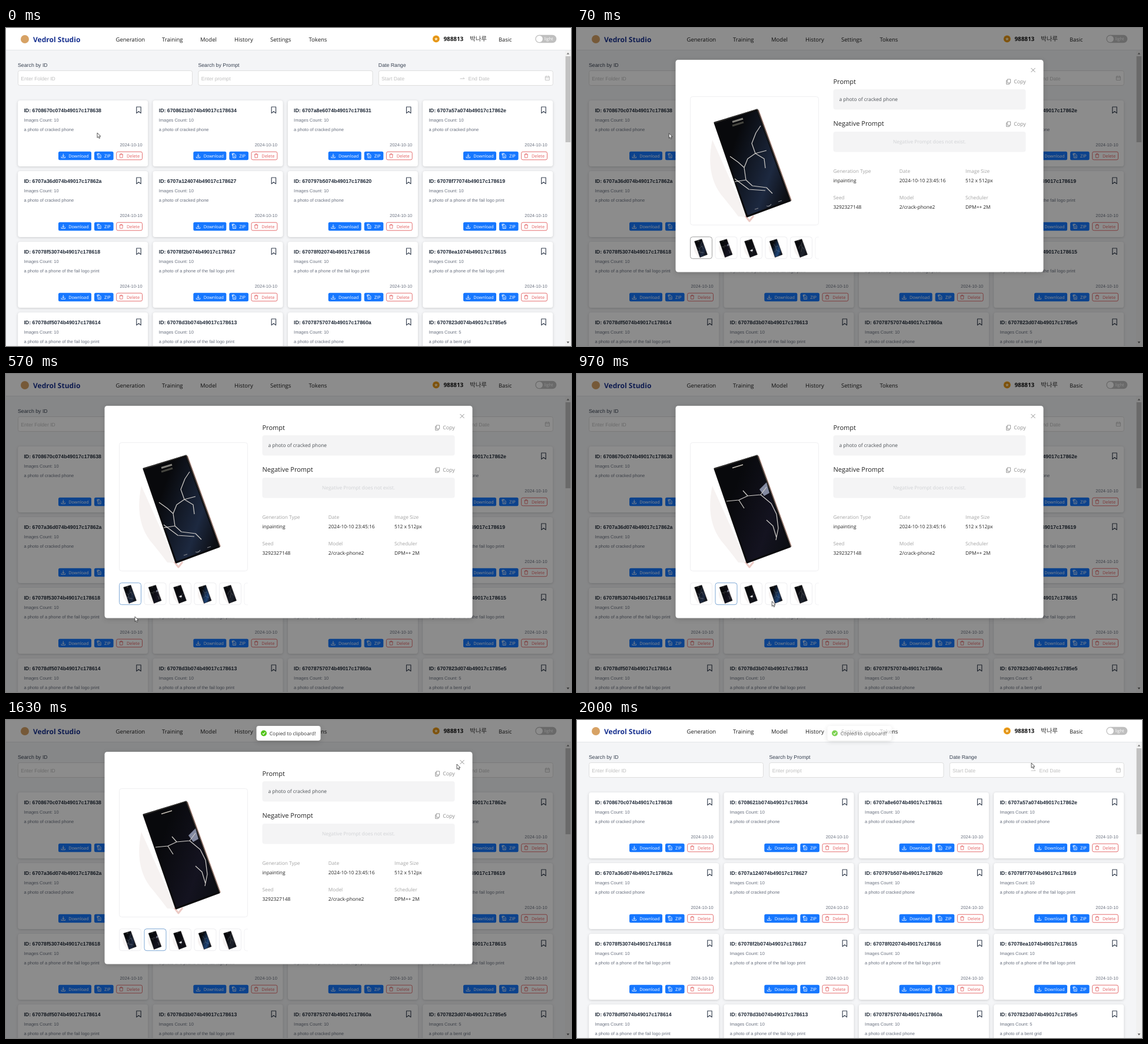
An HTML page for the animation above (2.03 s loop, 960 by 540 pixels).

```html
<!DOCTYPE html>
<html lang="en">
<head>
<meta charset="utf-8">
<title>Image history</title>
<style>
html, body { margin: 0; width: 100%; height: 100%; overflow: hidden; background: #f4f5f7; }
svg { display: block; }
text { white-space: pre; text-rendering: geometricPrecision; font-family: "Open Sans", "Noto Sans", sans-serif; }
.a { font-family: "Liberation Sans", Arial, sans-serif; }
.k { font-family: "Noto Sans CJK KR", "Noto Sans CJK", sans-serif; }
.b { font-weight: 700; }
.m { font-weight: 500; }
.card { filter: drop-shadow(0 1.5px 2px rgba(0,0,0,.17)); }
.pop { filter: drop-shadow(0 2px 4px rgba(0,0,0,.16)); }
</style>
</head>
<body>
<svg id="stage" width="960" height="540" viewBox="0 0 960 540" xmlns="http://www.w3.org/2000/svg"></svg>
<script>
const text = (x, y, size, fill, str, cls = '', anchor = 'start') =>
  `<text x="${x}" y="${y}" font-size="${size}" fill="${fill}" class="${cls}" text-anchor="${anchor}">${str}</text>`;
const rect = (x, y, w, h, fill, r = 0, more = '') =>
  `<rect x="${x}" y="${y}" width="${w}" height="${h}" rx="${r}" fill="${fill}" ${more}/>`;
const line = (d, color, w = 1, more = '') =>
  `<path d="${d}" fill="none" stroke="${color}" stroke-width="${w}" stroke-linejoin="round" ${more}/>`;
const shape = (d, fill, more = '') => `<path d="${d}" fill="${fill}" ${more}/>`;
const dot = (x, y, r, fill, more = '') => `<circle cx="${x}" cy="${y}" r="${r}" fill="${fill}" ${more}/>`;
const at = (x, y, body) => `<g transform="translate(${x} ${y})">${body}</g>`;

// ---- page ----
function header() {
  const nav = [['Generation', 186.5], ['Training', 265], ['Model', 330], ['History', 388], ['Settings', 449], ['Tokens', 514.5]];
  return rect(0, 0, 960, 37, '#fff') + rect(0, 37, 960, 1, '#e3e5e8')
    + dot(32, 19, 7, '#d7a265')
    + text(46, 23.6, 12.05, '#17308f', 'Vedrol Studio', 'b')
    + nav.map(([s, x]) => text(x, 22.6, 9.5, '#1c1c1c', s)).join('')
    + dot(730.8, 18.6, 6, '#f0a21c') + dot(730.8, 18.6, 4.4, '#dc8a12')
    + shape('M730.8 15.4l.95 2.1 2.3.2-1.75 1.5.55 2.3-2.05-1.2-2.05 1.2.55-2.3-1.75-1.5 2.3-.2z', '#ffe9b0')
    + text(743.4, 22.1, 9.9, '#111', '988813', 'b')
    + text(788, 22.2, 10.5, '#333', '박나루', 'k')
    + text(837, 22.5, 9.3, '#1c1c1c', 'Basic')
    + rect(899.3, 11.8, 36, 13.4, '#bfbfbf', 6.7) + dot(906.2, 18.5, 5.6, '#fff')
    + text(914.5, 21.2, 7.5, '#fff', 'light');
}

function search() {
  const field = (x, label, hint) => text(x, 66.4, 8.77, '#374151', label, 'a')
    + rect(x + .5, 72.5, 296, 25, '#fff', 3, 'stroke="#dedede"')
    + text(x + 5.3, 88.5, 8.65, '#bfbfbf', hint, 'a');
  return field(20, 'Search by ID', 'Enter Folder ID')
    + field(326.4, 'Search by Prompt', 'Enter prompt')
    + field(632.8, 'Date Range', 'Start Date')
    + text(785.5, 88.5, 8.65, '#bfbfbf', 'End Date', 'a')
    + line('M771.5 86h7.5l-2.2-1.8', '#b5b5b5', .8)
    + line('M916.3 82.3h7v6.2h-7zM916.3 84.6h7M918 81v2M921.6 81v2', '#b5b5b5', .8);
}

const tray = (c) => line('M0-3.3v5m-2-2 2 2 2-2M-3.2 1.5v1.9h6.4V1.5', c, .85);
const file = (c) => line('M-2-3h3l2 2v4.6h-5zM-2-1.2h-1.2v-2.6H.5M-.4.2h1.8M-.4 1.8h1.8', c, .8);
const bin = (c) => line('M-3.2-2.1h6.4M-1.3-2.1v-1.4h2.6v1.4M-2.5-2.1l.3 5.3h4.4l.3-5.3', c, .8);

function card([head, tail, kind], i) {
  const prompts = ['a photo of cracked phone', 'a photo of a phone of the fail logo print', 'a photo of a bent grid'];
  const blue = '#1677ff', red = '#e25f60', gray = '#6b7280';
  return at(20 + 229.33 * (i % 4), 123 + 120 * Math.floor(i / 4),
    rect(.2, 0, 221, 112, '#fff', 4, 'class="card"')
    + text(10.4, 19.5, 8.78, '#1f2937', `ID: ${head}074b49017c${tail}`, 'a b')
    + line('M201.8 11h7.4v10.6l-3.7-2.9-3.7 2.9z', '#374151', 1.15)
    + text(10.4, 36, 7.5, gray, 'Images Count: ' + (kind === 2 ? 5 : 10), 'a')
    + text(10.4, 52, 7.53, gray, prompts[kind], 'a')
    + text(211.6, 78, 7.47, gray, '2024-10-10', 'a', 'end')
    + rect(69, 86.7, 56, 14.6, blue, 2.5) + at(77.3, 93.9, tray('#fff')) + text(86.3, 96.6, 7.25, '#fff', 'Download')
    + rect(130, 86.7, 32.6, 14.6, blue, 2.5) + at(138.2, 93.9, file('#fff')) + text(147, 96.6, 7.4, '#fff', 'ZIP')
    + rect(167.7, 87.2, 43.8, 13.6, '#fff', 2.5, `stroke="${red}" stroke-width=".9"`)
    + at(175.8, 94, bin(red)) + text(185, 96.6, 7.3, red, 'Delete'));
}

function page() {
  const cards = [
    ['6708670c', '178638', 0], ['6708621b', '178634', 0], ['6707a8e6', '178631', 0], ['6707a57a', '17862e', 0],
    ['6707a36d', '17862a', 0], ['6707a124', '178627', 0], ['670797b5', '178620', 0], ['67078f77', '178619', 1],
    ['67078f53', '178618', 1], ['67078f2b', '178617', 1], ['67078f02', '178616', 1], ['67078ea1', '178615', 1],
    ['67078df5', '178614', 1], ['67078d3b', '178613', 1], ['67078757', '17860a', 0], ['6707823d', '1785e5', 2]];
  return rect(0, 0, 960, 540, '#f4f5f7') + search() + cards.map(card).join('')
    + rect(950, 38, 10, 502, '#f1f1f1') + rect(950.7, 48, 8.4, 146, '#c1c1c1')
    + shape('M952.6 44.8h4.6l-2.3-3z', '#777') + shape('M952.6 532.6h4.6l-2.3 3z', '#555') + header();
}

// ---- modal ----
const looks = [
  { tint: '#1d2940', crack: 'M120 50L112 62 105 80 111 97 98 106 92 121 82 112 68 102M111 97L126 106 128 122M92 121L95 142 106 152 130 155 140 165M95 142L76 145M76 140L100 158 128 160M111 97L130 92' },
  { tint: '#141320', crack: 'M62 100L83 98 98 91 120 89 130 76M120 89L138 104 147 122 150 146 146 166M98 91L90 82M83 98L92 112M130 132L141 142 147 162', chip: 'M118 80L130 68 135 86 126 91z' },
  { tint: '#12131a', crack: 'M90 140L112 132 138 104M112 132L122 160', chip: 'M98 134L122 122 126 142 108 146z' },
  { tint: '#1f4476', crack: 'M82 70L104 98 128 92M104 98L110 132 146 150M110 132L90 152' },
  { tint: '#1d222c', crack: 'M122 48L108 78 118 104 144 126M108 78L92 96 84 118M118 104L108 150' }];

function phone(i) {
  const { tint, crack, chip } = looks[i];
  return shape('M38 74Q26 130 52 166Q72 190 82 204L97 205z', '#f6f2f1')
    + line('M94 203L101 212 108 203', '#ebc9c4', 3)
    + line('M116 23L172 177', '#b9958b', 2)
    + shape('M42 45L114 23 170 177 97 204z', `url(#glass${i})`, 'stroke="#0b0b0d" stroke-width="3" stroke-linejoin="round"')
    + line('M42 45L114 22 171 177', '#5b5a52', .7)
    + line('M72 43.5L90 38', i ? '#c8c2b8' : '#83827c', i ? 1.6 : 3)
    + (i ? '' : line('M72 50L91 44', '#45453f', 3)
      + line('M130 186q5 2 8-3M110 192l6-2M150 179l6-2', '#83858c', 1.2))
    + (chip ? shape(chip, i === 1 ? '#8389a0' : '#d9dade') : '')
    + line(crack, '#d3d0cc', 1.2);
}

const glass = looks.map((l, i) => `<linearGradient id="glass${i}" x1="0" y1=".2" x2="1" y2=".7">
  <stop offset=".25" stop-color="#08090c"/><stop offset=".75" stop-color="${l.tint}"/><stop offset="1" stop-color="#0d0f15"/></linearGradient>`).join('');

function modal() {
  const copy = (y) => line(`M731.2 ${y - 3.8}h5.4v6.2h-5.4zM731.2 ${y - 1.8}h-1.6v6.4h5v-2.2`, '#8c8c8c', .85)
    + text(742.3, y + 3.2, 8.75, '#8c8c8c', 'Copy');
  const fact = (x, y, name, value) => text(x, y, 8.3, '#a3a3a3', name) + text(x, y + 16.1, 8.35, '#222', value);
  const thumb = (i) => at(192.5 + 42.5 * i, 354.7,
    rect(0, 0, 37, 37, '#fff', 4, 'class="thumb" stroke="#ededf0"')
    + `<g class="photo" transform="scale(.17)">${phone(i)}</g>`);
  return rect(167.5, 54, 625, 360.5, '#fff', 4.5, 'id="panel" class="pop"')
    + line('M771.5 68l7 7m0-7l-7 7', '#8c8c8c', .95)
    + `<g class="photo">${rect(192.5, 116.5, 218, 218, '#fff', 4, 'stroke="#efeff1"')}`
    + at(192, 116, `<g class="big">${phone(0)}</g><g class="big">${phone(1)}</g>`) + '</g>'
    + `<g id="thumbs">${looks.map((_, i) => thumb(i)).join('')}${line('M411 355h-2.5q-3.500 0-3.500 4v29q0 4 3.500 4h2.500', '#f3f3f5')}</g>`
    + text(435.5, 94.5, 11, '#222', 'Prompt', 'm') + copy(90.8)
    + rect(435.5, 104, 327, 34.5, '#f4f4f5', 4)
    + text(445.5, 124.3, 8.37, '#4b5055', 'a photo of cracked phone')
    + text(435.5, 166.4, 11, '#222', 'Negative Prompt', 'm') + copy(162.8)
    + rect(435.5, 176, 327, 34.5, '#f4f4f5', 4)
    + text(599, 196.4, 8.35, '#d0d2d5', 'Negative Prompt does not exist.', '', 'middle')
    + fact(435.5, 245.8, 'Generation Type', 'inpainting')
    + fact(547.8, 245.8, 'Date', '2024-10-10 23:45:16')
    + fact(660, 245.8, 'Image Size', '512 x 512px')
    + fact(435.5, 290.8, 'Seed', '3292327148')
    + fact(547.8, 290.8, 'Model', '2/crack-phone2')
    + fact(660, 290.8, 'Scheduler', 'DPM++ 2M');
}

const toast = rect(425.5, 10, 109, 25, '#fff', 4, 'class="pop"') + dot(438, 22.5, 5, '#52c41a')
  + line('M435.7 22.600l1.700 1.800 3-3.700', '#fff', 1.1)
  + text(447.8, 25.6, 8.4, '#333', 'Copied to clipboard!');

const arrow = shape('M0 0V8.300L1.900 6.600 3.200 9.500 4.700 8.800 3.400 6H5.900z', '#fff',
  'stroke="#222" stroke-width=".75" stroke-linejoin="round"');

const stage = document.getElementById('stage');
stage.innerHTML = `<defs>${glass}</defs>${page()}`
  + rect(0, 0, 960, 540, '#000', 0, 'id="mask"')
  + `<g id="modal">${modal()}</g><g id="toast">${toast}</g><g id="cursor">${arrow}</g>`;

// ---- motion ----
const LOOP = 2030, STEP = 100 / 3;
const el = (id) => document.getElementById(id);
const all = (sel) => [...stage.querySelectorAll(sel)];
const [mask, box, panel, thumbs, note, cursor] = ['mask', 'modal', 'panel', 'thumbs', 'toast', 'cursor'].map(el);
const frames = all('.thumb'), bigs = all('.big'), photos = all('.photo');

// time, x, y of the pointer tip
const path = [[0, 155, 178], [33, 155, 178], [167, 163, 183], [567, 219, 412], [780, 251, 376], [870, 251, 376],
  [1167, 573.5, 416.5], [1330, 745, 91], [1430, 745, 91], [1633, 766, 75], [1800, 772, 73], [2030, 772, 73]];

function pointer(t) {
  const i = Math.max(1, path.findIndex((p) => p[0] > t));
  const [a, b] = [path[i - 1], path[i]];
  const u = (t - a[0]) / (b[0] - a[0]), e = u * u * (3 - 2 * u);
  return [a[1] + (b[1] - a[1]) * e, a[2] + (b[2] - a[2]) * e];
}

// dim layer, modal opacity and modal scale
function opening(n) {
  if (n === 0 || n >= 60) return [0, 0, 1];
  if (n === 1) return [.1, .5, .54];
  if (n === 59) return [.25, .5, .8];
  return [.45, 1, 1];
}

function notice(n) {
  if (n < 41) return [0, -12];
  if (n === 41) return [.55, -5];
  return [n >= 60 ? .75 : 1, 0];
}

function draw(t) {
  const n = Math.floor((t + 3.4) / STEP);
  const [dim, alpha, scale] = opening(n);
  mask.setAttribute('opacity', dim);
  box.setAttribute('opacity', alpha);
  box.setAttribute('transform', `translate(155 178) scale(${scale}) translate(-155 -178)`);

  const loading = n <= 1;
  panel.setAttribute('height', loading ? 330 : 360.5);
  thumbs.setAttribute('transform', `translate(0 ${loading ? -30 : 0})`);
  photos.forEach((p) => p.setAttribute('visibility', loading ? 'hidden' : 'inherit'));

  const picked = n >= 25 ? 1 : 0;
  bigs.forEach((g, i) => g.setAttribute('display', i === picked ? 'inline' : 'none'));
  frames.forEach((f, i) => f.setAttribute('stroke', i !== picked ? '#ededf0' : n < 7 ? '#a0a0a0' : '#7fa9d6'));

  const [show, dy] = notice(n);
  note.setAttribute('opacity', show);
  note.setAttribute('transform', `translate(0 ${dy})`);
  cursor.setAttribute('transform', `translate(${pointer(n * STEP).join(' ')})`);
}

const start = performance.now();
function tick() {
  draw((performance.now() - start) % LOOP);
  requestAnimationFrame(tick);
}
tick();
</script>
</body>
</html>
```
